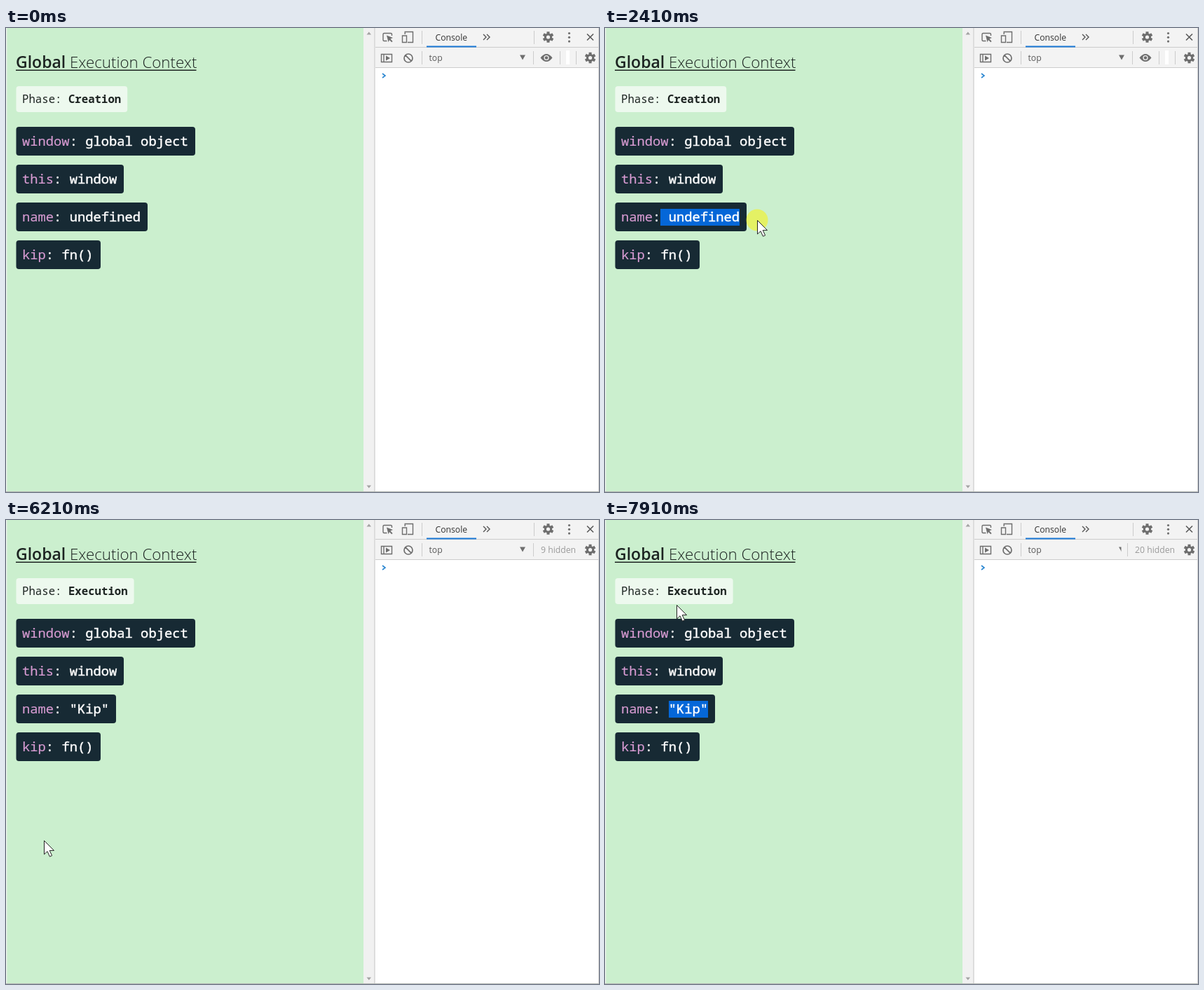
An HTML page with a canvas for the animation above (8 s loop, 846 by 662 pixels).

```html
<!DOCTYPE html>
<html lang="en">
<head>
<meta charset="utf-8">
<title>Global Execution Context</title>
<style>
html, body { margin: 0; width: 100%; height: 100%; overflow: hidden; background: #fff; }
canvas { display: block; width: 846px; height: 662px; }
</style>
</head>
<body>
<canvas id="stage"></canvas>
<script>
const W = 846, H = 662, LOOP = 8000;
const SANS = '"Open Sans", "Noto Sans", sans-serif';
const MONO = '"Noto Sans Mono", "DejaVu Sans Mono", monospace';
const CODE = 18.8, CHAR = CODE * 0.6, LEFT = 14.5, TEXT_X = 23;
const GREY = '#6e6e6e', RULE = '#ccc', BAR = '#f3f3f3';
const canvas = document.getElementById('stage');
const ctx = canvas.getContext('2d');
const dpr = window.devicePixelRatio || 1;
canvas.width = W * dpr;
canvas.height = H * dpr;

const EXECUTE = 3270, RUN = 5040, ASSIGN = 5580;
const POINTER_STEP = 78, LOG_STEP = 159;

const linear = k => k;
const easeOut = k => k * (2 - k);
const mix = (a, b, k) => a + (b - a) * k;

// Each leg moves the pointer on from where the last one ended;
// a leg with columns also selects text until the next leg starts
const edge = { x: 44, y: 502 };
const legs = [
  { start: 840, time: 400, x: 85, y: 291, ease: easeOut },
  { start: 1240, time: 390, x: 154, y: 312, ease: linear },
  { start: 1710, time: 1, x: 84, y: 273, ease: linear },
  { start: 1860, time: 550, x: 217, y: 274, ease: linear, columns: [5, 15] },
  { start: 2790, time: 160, ...edge, ease: linear, leaves: true },
  { start: 6130, time: 760, x: 98, y: 267, ease: easeOut },
  { start: 6970, time: 300, x: 150, y: 268, ease: linear, columns: [6, 11] },
  { start: 7590, time: 320, x: 102, y: 121, ease: easeOut }
];

const latest = (t, test = () => true) => legs.findLast(l => l.start <= t && test(l));

function pointerAt(t) {
  const leg = latest(t);
  if (!leg || (leg.leaves && t >= leg.start + leg.time)) return null;
  const steps = Math.max(1, Math.round(leg.time / POINTER_STEP));
  const done = Math.floor((t - leg.start) / leg.time * steps + 0.01);
  const k = leg.ease(Math.min(1, done / steps));
  const from = legs[legs.indexOf(leg) - 1] || edge;
  return { x: mix(from.x, leg.x, k), y: mix(from.y, leg.y, k) };
}

function hiddenCount(t) {
  if (t < EXECUTE) return 0;
  return t < RUN ? 1 : 2 + Math.floor((t - RUN) / LOG_STEP);
}

function rect(x, y, w, h, color) {
  ctx.fillStyle = color;
  ctx.fillRect(x, y, w, h);
}

function rounded(b, color) {
  ctx.fillStyle = color;
  ctx.beginPath();
  ctx.roundRect(b.x, b.y, b.w, b.h, 4);
  ctx.fill();
}

function text(str, x, y, font, color, align = 'left') {
  ctx.font = font;
  ctx.fillStyle = color;
  ctx.textAlign = align;
  ctx.fillText(str, x, y);
}

function code(str, column, y, color, weight) {
  const x = TEXT_X + column * CHAR;
  text(str, x, y, CODE + 'px ' + MONO, color);
  ctx.strokeStyle = color;
  ctx.lineWidth = weight;
  ctx.strokeText(str, x, y);
}

function disc(x, y, r, color) {
  ctx.fillStyle = color;
  ctx.beginPath();
  ctx.arc(x, y, r, 0, 7);
  ctx.fill();
}

function fill(d, color = GREY) {
  ctx.fillStyle = color;
  ctx.fill(new Path2D(d));
}

function line(d, width = 1.4, color = GREY) {
  ctx.strokeStyle = color;
  ctx.lineWidth = width;
  ctx.stroke(new Path2D(d));
}

function divider(x, y) {
  rect(x, y, 1, 19, RULE);
}

function gear(x, y) {
  ctx.save();
  ctx.translate(x, y);
  disc(0, 0, 5.6, GREY);
  for (let i = 0; i < 6; i++) {
    ctx.rotate(Math.PI / 3);
    rect(-2, -7.8, 4, 4, GREY);
  }
  disc(0, 0, 2.6, BAR);
  ctx.restore();
}

function variables(t) {
  return [
    ['window', 'global object'],
    ['this', 'window'],
    ['name', t < ASSIGN ? 'undefined' : '"Kip"'],
    ['kip', 'fn()']
  ].map(([key, value], i) => {
    const right = TEXT_X + (key.length + value.length + 2) * CHAR + 10;
    return { key, value, x: LEFT, y: 141 + 54 * i, w: Math.round(right) - LEFT, h: 41 };
  });
}

function drawSelection(t) {
  const leg = latest(t, l => l.columns);
  if (!leg || (leg.start < EXECUTE) !== (t < EXECUTE)) return;
  const [first, last] = leg.columns;
  let column = last;
  if (latest(t) === leg) {
    const reached = Math.round((pointerAt(t).x - TEXT_X) / CHAR);
    column = Math.max(first, Math.min(last, reached));
  }
  const from = Math.round(TEXT_X + first * CHAR);
  rect(from, 258, Math.round(TEXT_X + column * CHAR) - from, 24, '#0567d8');
}

function drawPage(t, boxes) {
  const ink = '#1c2321';
  rect(0, 0, 510, H, '#cbefce');
  rect(0, 0, 1.5, H, '#e9f2ea');
  text('Global', 14, 57, '600 23px ' + SANS, ink);
  text('Execution Context', 91, 57, '300 22.3px ' + SANS, ink);
  rect(14, 59.5, 257.5, 1.5, ink);

  const phase = t < EXECUTE ? 'Creation' : 'Execution';
  const size = 15.7, advance = size * 0.6;
  rounded({ x: LEFT, y: 83, w: (phase.length + 7) * advance + 17.4, h: 37 }, '#edf9ee');
  text('Phase:', TEXT_X, 107, size + 'px ' + MONO, ink);
  text(phase, TEXT_X + 7 * advance, 107, `bold ${size}px ${MONO}`, ink);

  boxes.forEach(b => rounded(b, '#172a34'));
  drawSelection(t);
  boxes.forEach(({ key, value, y }) => {
    code(key, 0, y + 27, '#d79bd2', 0.15);
    code(':', key.length, y + 27, '#fff', 0.45);
    code(value, key.length + 2, y + 27, '#fff', 0.45);
  });

  rect(510, 0, 16, H, '#f1f1f1');
  fill('M514.5 9.5h6.5l-3.25-4z', '#a3a3a3');
  fill('M514.5 652.5h6.5l-3.25 4z', '#a3a3a3');
}

function drawTabs() {
  line('M543.5 18.5h-4a1.5 1.5 0 0 1-1.5-1.5v-8a1.5 1.5 0 0 1 1.5-1.5h9.5a1.5 1.5 0 0 1 1.5 1.5v2');
  fill('M543 10.5l9 3.5-3.6 1.5 3.2 3.4-1.4 1.3-3.2-3.3-1.4 3.3z');
  line('M569.2 9V5.5h11.3v15h-7.5M565.5 11h6v9.5h-6z');
  text('Console', 612.5, 18, '12.2px ' + SANS, '#333');
  rect(600, 25.5, 71, 2, '#1a78d6');
  line('M681 9l4 4-4 4M686 9l4 4-4 4', 1.4, '#555');
  gear(773.5, 13);
  for (let i = -1; i <= 1; i++) disc(803.5, 13.3 + i * 5.8, 1.6, GREY);
  line('M829 8.5l9 9M838 8.5l-9 9', 1.6, '#5a5a5a');
  divider(593, 4);
  divider(753, 4);
}

function drawFilters(t) {
  line('M535.5 37.5h15v11h-15zM539 37.5v11');
  fill('M542 39.5l6 3.5-6 3.5z');
  line('M580 43a6 6 0 1 1-12 0a6 6 0 1 1 12 0M569.8 38.8l8.4 8.4', 1.7);
  text('top', 603.5, 47, '12.2px ' + SANS, '#5a5a5a');
  divider(593, 33);
  gear(833.5, 42.5);

  // A wider count pushes its divider left and cuts off the arrow
  const count = hiddenCount(t);
  const wide = count > 9;
  ctx.save();
  ctx.beginPath();
  ctx.rect(733, 30, wide ? 3.5 : 10, 24);
  ctx.clip();
  fill('M733 38.5h8l-4 7z');
  ctx.restore();
  divider(wide ? 745 : 752, 33);

  if (count) {
    text(count + ' hidden', 813, 47, '12.2px ' + SANS, '#9a9a9a', 'right');
    return;
  }
  fill('M762.5 42.5q8.5-11 17 0q-8.5 11-17 0z');
  disc(771, 42.5, 3.6, BAR);
  disc(771, 42.5, 2.3, GREY);
  rect(799, 32, 5, 20, '#fff');
  divider(790, 33);
  divider(813, 33);
}

function drawConsole(t) {
  rect(526, 0, W - 526, H, '#fff');
  rect(527, 0, W - 527, 57, BAR);
  rect(527, 27, W - 527, 1, RULE);
  rect(527, 56, W - 527, 1, RULE);
  drawTabs();
  drawFilters(t);
  line('M537 65l4 3-4 3', 1.6, '#2a86d1');
  rect(525.5, 0, 1, H, '#c4c4c4');
  rect(845, 0, 1, H, '#d0d0d0');
  rect(0, 661, W, 1, '#b4b8b4');
}

function drawPointer(t, boxes) {
  const pos = pointerAt(t);
  if (!pos) return;
  const { x, y } = pos;
  if (latest(t).columns) disc(x, y, 15.5, 'rgba(245,242,30,0.6)');
  const overText = boxes.some(b => x > b.x && x < b.x + b.w && y > b.y && y < b.y + b.h);
  ctx.save();
  ctx.translate(Math.round(x), Math.round(y));
  if (overText) {
    line('M-5-9.5h3.5l1.5 1.5l1.5-1.5h3.5M0-8V9M-5 10.5h3.5l1.5-1.5l1.5 1.5h3.5', 1.3, '#f2f2f2');
  } else {
    const arrow = 'M0.5 0.5V20l4.5-4.2l3.4 7.4l3.2-1.4l-3.4-7.2h6.3z';
    fill(arrow, '#fff');
    line(arrow, 1, '#222');
  }
  ctx.restore();
}

function frame(now) {
  const t = now % LOOP;
  const boxes = variables(t);
  ctx.setTransform(dpr, 0, 0, dpr, 0, 0);
  drawPage(t, boxes);
  drawConsole(t);
  drawPointer(t, boxes);
}

const begin = performance.now();
function tick() {
  frame(performance.now() - begin);
  requestAnimationFrame(tick);
}
tick();
</script>
</body>
</html>
```
